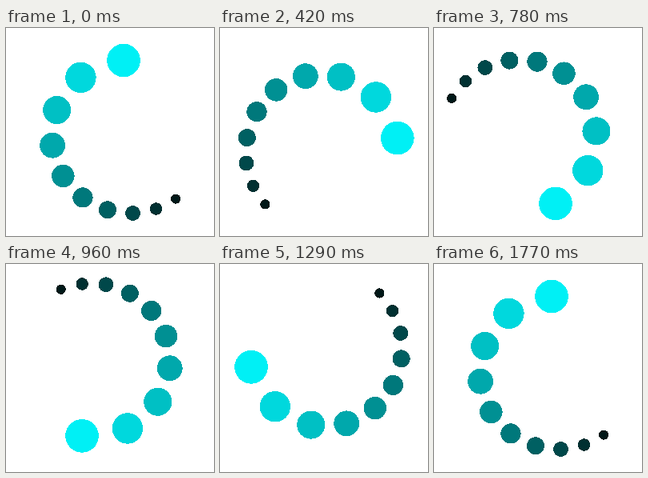
Write an HTML page with a canvas that moves like this. It is 260 px wide and 260 px high and loops after 1800 ms.

```html
<!DOCTYPE html>
<html lang="en">
<head>
<meta charset="utf-8">
<title>Spinner</title>
<style>
  html, body { margin: 0; width: 100%; height: 100%; overflow: hidden; background: #fff; }
  canvas { display: block; width: 260px; height: 260px; }
</style>
</head>
<body>
<canvas id="stage" width="260" height="260"></canvas>
<script>
const ctx = document.getElementById("stage").getContext("2d");
const LOOP = 1800, STEP = 30, CENTER = 130.5;

// [distance from the centre, start angle in degrees], head to tail
const dots = [
  [91.5, -79.6], [78, -118.4], [72.5, -157.3], [74.2, 167.4], [80.4, 137.4],
  [88.4, 113], [96.9, 92.1], [104.9, 74.5], [111.3, 59.1], [116.5, 45.5]
];

// Half a turn in 30 steps, the other half in 29
function turn(step) {
  return step <= 30 ? step * 6 : 180 + (step - 30) * 180 / 29;
}

// Hard-edged disc, filled row by row
function disc(cx, cy, r) {
  for (let y = Math.floor(cy - r); y <= cy + r; y++) {
    const dy = y + 0.5 - cy;
    if (Math.abs(dy) >= r) continue;
    const half = Math.sqrt(r * r - dy * dy);
    const left = Math.round(cx - half), right = Math.round(cx + half);
    ctx.fillRect(left, y, right - left, 1);
  }
}

function draw(ms) {
  const angle = turn(Math.floor((ms % LOOP) / STEP));
  ctx.fillStyle = "#fff";
  ctx.fillRect(0, 0, 260, 260);
  dots.forEach(([dist, start], i) => {
    const a = (start + angle) * Math.PI / 180;
    const shade = 1 - i / 10;
    ctx.fillStyle = `rgb(0,${Math.round(240 * shade)},${Math.round(245 * shade)})`;
    disc(CENTER + dist * Math.cos(a), CENTER + dist * Math.sin(a), 20.8 - 1.64 * i);
  });
}

const begin = performance.now();
function tick() {
  draw(performance.now() - begin);
  requestAnimationFrame(tick);
}
tick();
</script>
</body>
</html>
```
